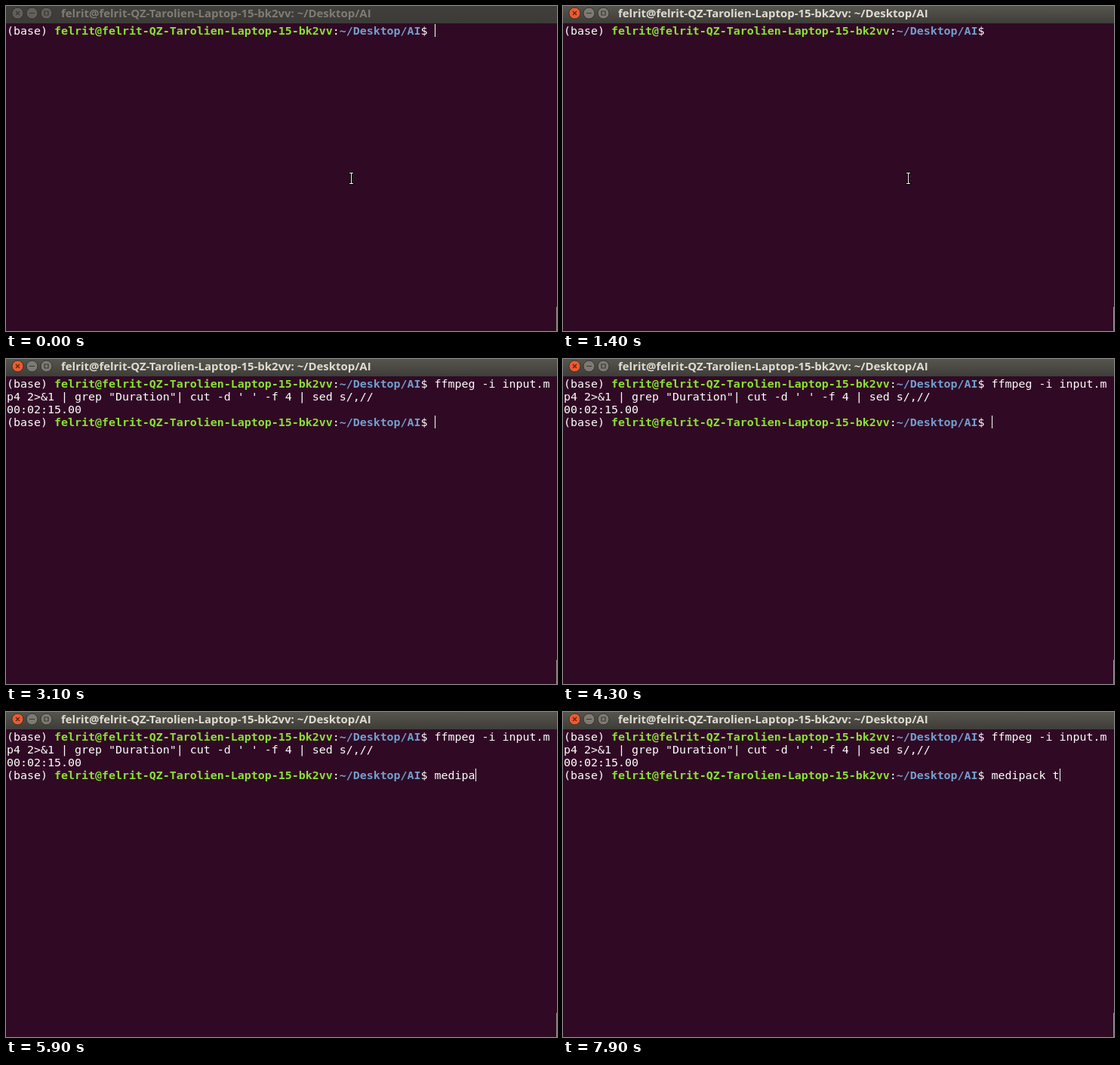
An HTML page for the animation above (8000 ms loop, 730 by 431 pixels).

```html
<!DOCTYPE html>
<html lang="en">
<head>
<meta charset="utf-8">
<title>Terminal</title>
<style>
  html, body { margin: 0; width: 100%; height: 100%; overflow: hidden; background: #300a24; }
  #bar { position: absolute; top: 0; left: 0; width: 730px; height: 23px;
    background: linear-gradient(#403f3b, #3c3b37); color: #7f7c75; }
  #bar.active { background: linear-gradient(#56554d, #3e3d39); color: #dfdbd2; }
  #title { position: absolute; left: 73px; white-space: pre;
    font: bold 14.95px/19px "Open Sans", sans-serif; }
  svg { position: absolute; top: 0; left: 0; }
  #buttons circle { fill: #62605a; stroke: #33322e; }
  #buttons path { fill: none; stroke: #383733; stroke-width: 1.2; }
  .active #buttons circle { fill: #7d7a72; }
  .active #buttons .close { fill: #ec5b31; }
  .active #buttons .cross { stroke: #58230f; }
  #screen { position: absolute; left: 1px; top: 25px; margin: 0; color: #fff;
    font: 14.95px/17px "DejaVu Sans Mono", monospace; }
  .host { color: #8ae234; }
  .path { color: #729fcf; }
  #cursor { position: absolute; width: 1px; height: 17px; background: #fff; }
  #edge { position: absolute; left: 729px; top: 399px; width: 1px; height: 32px; background: #9d8f90; }
</style>
</head>
<body>
<div id="bar">
  <svg id="buttons" width="64" height="23">
    <g transform="translate(.5)">
      <circle class="close" cx="15" cy="9.5" r="7.5"/><circle cx="34" cy="9.5" r="7.5"/><circle cx="53" cy="9.5" r="7.5"/>
      <path class="cross" d="M12.5 7l5 5m0-5l-5 5"/><path d="M30.5 9.5h7M50.5 7h5v5h-5z"/>
    </g>
  </svg>
  <div id="title"></div>
</div>
<pre id="screen"></pre>
<div id="cursor"></div>
<svg id="pointer" width="730" height="431" fill="none">
  <path d="M454 221.5h7M457.5 221.5v14M454 235.5h7" stroke="#000" stroke-width="3"/>
  <path d="M455 221.5h5M457.5 221.5v14M455 235.5h5" stroke="#fff"/>
</svg>
<div id="edge"></div>
<script>
const LOOP = 8000, CELL = 9, ROW = 17, PROMPT_COLS = 63;
const FOCUS = 800, RUN = 2000, RESULT = 3100;
const host = 'felrit@felrit-QZ-Tarolien-Laptop-15-bk2vv', path = '~/Desktop/AI';
const prompt = `(base) <b class="host">${host}</b>:<b class="path">${path}</b>$ `;
const command = `ffmpeg -i input.m\np4 2>&amp;1 | grep "Duration"| cut -d ' ' -f 4 | sed s/,//`;
const typed = 'medipack t';
const keyTimes = [4900, 5000, 5300, 5500, 5800, 5900, 6000, 6100, 6400, 7900];
const cursorOff = [[1400, 2000], [2600, 3100], [3700, 4300], [7000, 7600]];
const el = id => document.getElementById(id);
const [bar, screen, cursor, pointer] = ['bar', 'screen', 'cursor', 'pointer'].map(el);
el('title').textContent = `${host}: ${path}`;

let shown = '';
function draw() {
  const t = performance.now() % LOOP;
  const keys = keyTimes.filter(k => t >= k).length;
  let text = prompt, col = PROMPT_COLS, row = 0;
  if (t >= RUN) { text += command; col = 54; row = 1; }
  if (t >= RESULT) {
    text += `\n00:02:15.00\n${prompt}${typed.slice(0, keys)}`;
    col = PROMPT_COLS + keys;
    row = 3;
  }
  if (text !== shown) screen.innerHTML = shown = text;
  bar.className = t >= FOCUS ? 'active' : '';
  pointer.style.display = t < RUN ? '' : 'none';
  cursor.style.left = 1 + col * CELL + 'px';
  cursor.style.top = 24 + row * ROW + 'px';
  cursor.style.visibility = cursorOff.some(([a, b]) => t >= a && t < b) ? 'hidden' : 'visible';
  requestAnimationFrame(draw);
}
draw();
</script>
</body>
</html>
```
